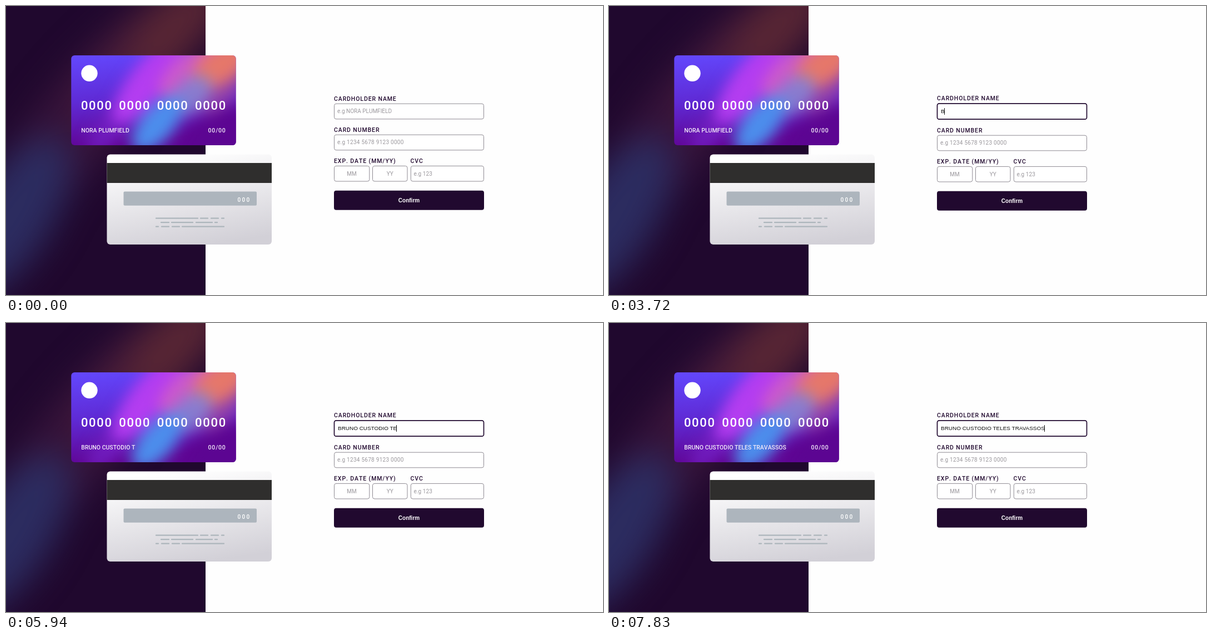
Write an HTML page that moves like this. It is 1074 px wide and 521 px high and loops after 8000 ms.

```html
<!DOCTYPE html>
<html lang="en">
<head>
<meta charset="utf-8">
<title>Card details form</title>
<style>
html, body { margin: 0; width: 100%; height: 100%; overflow: hidden; background: #fefefe; }
svg { display: block; }
text { font-family: Roboto, sans-serif; font-kerning: none; white-space: pre; }
.label { font-size: 10.5px; font-weight: 500; letter-spacing: .9px; fill: #21092f; }
.hint { font-size: 10px; fill: #9a979c; }
.mid { text-anchor: middle; }
.box { fill: #fff; stroke: #8f8b93; stroke-width: 1; }
.on { stroke: #21092f; stroke-width: 1.7; }
.card { font-size: 10.5px; font-weight: 500; fill: #f1e9f8; }
.digits { font-size: 22px; font-weight: 500; letter-spacing: 1.7px; fill: #fff; }
.typed { font: 9.95px "Liberation Sans", Arial, sans-serif; fill: #111; }
.button { font: bold 10px "Liberation Sans", Arial, sans-serif; fill: #fff; }
</style>
</head>
<body>
<svg width="1074" height="521" viewBox="0 0 1074 521">
  <defs>
    <linearGradient id="frontFill" x1="0" y1="0" x2=".2" y2="1">
      <stop offset="0" stop-color="#6348fe"/>
      <stop offset=".5" stop-color="#5f2bd6"/>
      <stop offset="1" stop-color="#610595"/>
    </linearGradient>
    <linearGradient id="backFill" x1=".35" y1="0" x2=".6" y2="1">
      <stop offset="0" stop-color="#fff"/>
      <stop offset="1" stop-color="#d2d0d7"/>
    </linearGradient>
    <filter id="soft" x="-60%" y="-60%" width="220%" height="220%" color-interpolation-filters="sRGB">
      <feGaussianBlur stdDeviation="13"/>
    </filter>
    <filter id="wide" x="-80%" y="-80%" width="260%" height="260%" color-interpolation-filters="sRGB">
      <feGaussianBlur stdDeviation="30"/>
    </filter>
    <clipPath id="panelClip"><rect width="359" height="521"/></clipPath>
    <clipPath id="frontClip"><rect x="117.3" y="89" width="296.4" height="162" rx="6"/></clipPath>
  </defs>

  <rect width="1074" height="521" fill="#fefefe"/>
  <g clip-path="url(#panelClip)">
    <rect width="359" height="521" fill="#20082e"/>
    <g id="panelArt" filter="url(#wide)"></g>
  </g>

  <g clip-path="url(#frontClip)">
    <rect x="117" y="89" width="297" height="162" fill="url(#frontFill)"/>
    <g id="frontArt" filter="url(#soft)"></g>
  </g>
  <circle cx="150" cy="121.3" r="14.7" fill="#fff"/>
  <g id="digits"></g>
  <text id="cardName" class="card" x="135.3" y="228.3"></text>
  <text class="card" x="363.6" y="228.3" style="letter-spacing:.8px">00/00</text>

  <rect x="181.5" y="267.4" width="296.5" height="162.6" rx="6" fill="url(#backFill)"/>
  <rect x="181.5" y="283" width="296.5" height="36" fill="#2f2e2d"/>
  <rect x="211.5" y="334.5" width="239.5" height="25.3" rx="2" fill="#adb5bd"/>
  <text class="card" x="416.6" y="352.7" style="font-size:10px;letter-spacing:2.3px;fill:#fff">000</text>
  <path d="M270 382.7H345M350 382.7H363M369 382.7H382M388 382.7H392
    M279 390.2H293M298 390.2H336M342 390.2H371M376 390.2H380
    M270 397.7H274M280 397.7H293M299 397.7H312M317 397.7H392"
    stroke="#adb6bc" stroke-width="2.3" stroke-linecap="round"/>

  <g id="top">
    <text class="label" x="590" y="170.5">CARDHOLDER NAME</text>
  </g>
  <rect id="nameBox" class="box" x="590.5" width="269" rx="3.5"/>
  <text id="nameHint" class="hint" y="193">e.g NORA PLUMFIELD</text>
  <text id="typed" class="typed" x="597" y="192.6"></text>
  <rect id="caret" y="184" width="1" height="12" fill="#111"/>

  <g id="rest">
    <text class="label" x="590" y="226.5">CARD NUMBER</text>
    <rect class="box" x="590.5" y="232.2" width="269" height="27.6" rx="3.5"/>
    <text class="hint" x="596" y="249.2" style="letter-spacing:.27px">e.g 1234 5678 9123 0000</text>
    <text class="label" x="590" y="282.5">EXP. DATE (MM/YY)</text>
    <text class="label" x="727.6" y="282.5">CVC</text>
    <rect class="box" x="590.5" y="288.4" width="63.3" height="27.6" rx="3.5"/>
    <rect class="box" x="659.5" y="288.4" width="62.5" height="27.6" rx="3.5"/>
    <rect class="box" x="728.3" y="288.4" width="131.2" height="27.6" rx="3.5"/>
    <text class="hint mid" x="622" y="305.6">MM</text>
    <text class="hint mid" x="690.7" y="305.6">YY</text>
    <text class="hint" x="733.4" y="305.6" style="letter-spacing:.1px">e.g 123</text>
    <rect x="590" y="332.7" width="270" height="35" rx="4" fill="#21092f"/>
    <text class="button mid" x="725" y="353.7">Confirm</text>
  </g>
</svg>
<script>
const LOOP = 8000, FOCUS = 1060;
const NAME = 'BRUNO CUSTODIO TELES TRAVASSOS';
const SAMPLE = 'NORA PLUMFIELD';
const BLINKS = [1520, 2000, 2530, 3060, 3520, 3720];

// Evenly spaced steps from start to end: i = field, c = card, b = both gain a letter
const BURSTS = [
  [3720, 3720, 'i'], [3920, 4260, 'bcici'], [4390, 4600, 'bcic'],
  [4730, 5010, 'ibbbc'], [5150, 5940, 'ibbcibbb'], [6010, 6540, 'cicbic'],
  [6690, 6690, 'i'], [6870, 6870, 'b'], [6950, 7630, 'cibcibbcbb'],
  [7760, 7830, 'ic']
];

const $ = id => document.getElementById(id);

// Soft streaks: cx, cy, rx, ry, angle, colour, opacity
const streaks = list => list.map(([x, y, rx, ry, a, fill, o]) =>
  `<ellipse rx="${rx}" ry="${ry}" fill="${fill}" opacity="${o}" transform="translate(${x} ${y}) rotate(${a})"/>`
).join('');

$('panelArt').innerHTML = streaks([
  [130, 210, 270, 75, -52, '#3a163d', .85],
  [255, 85, 170, 62, -48, '#4c1e38', .9],
  [310, 35, 110, 52, -45, '#5a2735', .9],
  [10, 380, 165, 72, -58, '#2c2c60', 1]
]);
$('frontArt').innerHTML = streaks([
  [395, 245, 85, 55, -30, '#5c0592', 1],
  [195, 210, 75, 24, -52, '#7420c4', .8],
  [255, 135, 95, 32, -52, '#b43df0', 1],
  [325, 113, 68, 25, -46, '#d05cc8', .95],
  [388, 106, 66, 34, -38, '#e6776a', 1],
  [392, 160, 50, 17, -40, '#9c46a6', .8],
  [332, 162, 46, 28, -44, '#8a80d0', .95],
  [272, 213, 62, 30, -50, '#4c8eec', 1]
]);
$('digits').innerHTML = [0, 1, 2, 3].map(i =>
  `<text class="digits" x="${134.9 + i * 68.4}" y="186.6">0000</text>`).join('');

function lettersAt(t) {
  let field = 0, card = 0;
  for (const [start, end, keys] of BURSTS) {
    const gap = (end - start) / Math.max(1, keys.length - 1);
    [...keys].forEach((key, i) => {
      if (t < Math.round(start + i * gap)) return;
      if (key !== 'c') field++;
      if (key !== 'i') card++;
    });
  }
  return { field, card };
}

function render(t) {
  const focused = t >= FOCUS;
  const { field, card } = lettersAt(t);
  const caretOn = focused && BLINKS.filter(b => t >= b).length % 2 === 0;

  $('top').setAttribute('transform', `translate(0 ${focused ? -1 : 0})`);
  $('rest').setAttribute('transform', `translate(0 ${focused ? 1 : 0})`);
  $('nameBox').setAttribute('class', focused ? 'box on' : 'box');
  $('nameBox').setAttribute('y', focused ? 175.8 : 176.2);
  $('nameBox').setAttribute('height', focused ? 28.4 : 27.6);
  $('nameHint').setAttribute('x', focused ? 596.7 : 596);
  $('nameHint').style.display = field ? 'none' : '';

  $('typed').textContent = NAME.slice(0, field);
  $('cardName').textContent = card ? NAME.slice(0, card) : SAMPLE;
  const width = field ? $('typed').getComputedTextLength() : 0;
  $('caret').setAttribute('x', Math.floor(597 + width - .4 + (field ? 0 : .5)));
  $('caret').style.display = caretOn ? '' : 'none';
}

const began = performance.now();
function tick() {
  render((performance.now() - began) % LOOP);
  requestAnimationFrame(tick);
}
tick();
</script>
</body>
</html>
```
